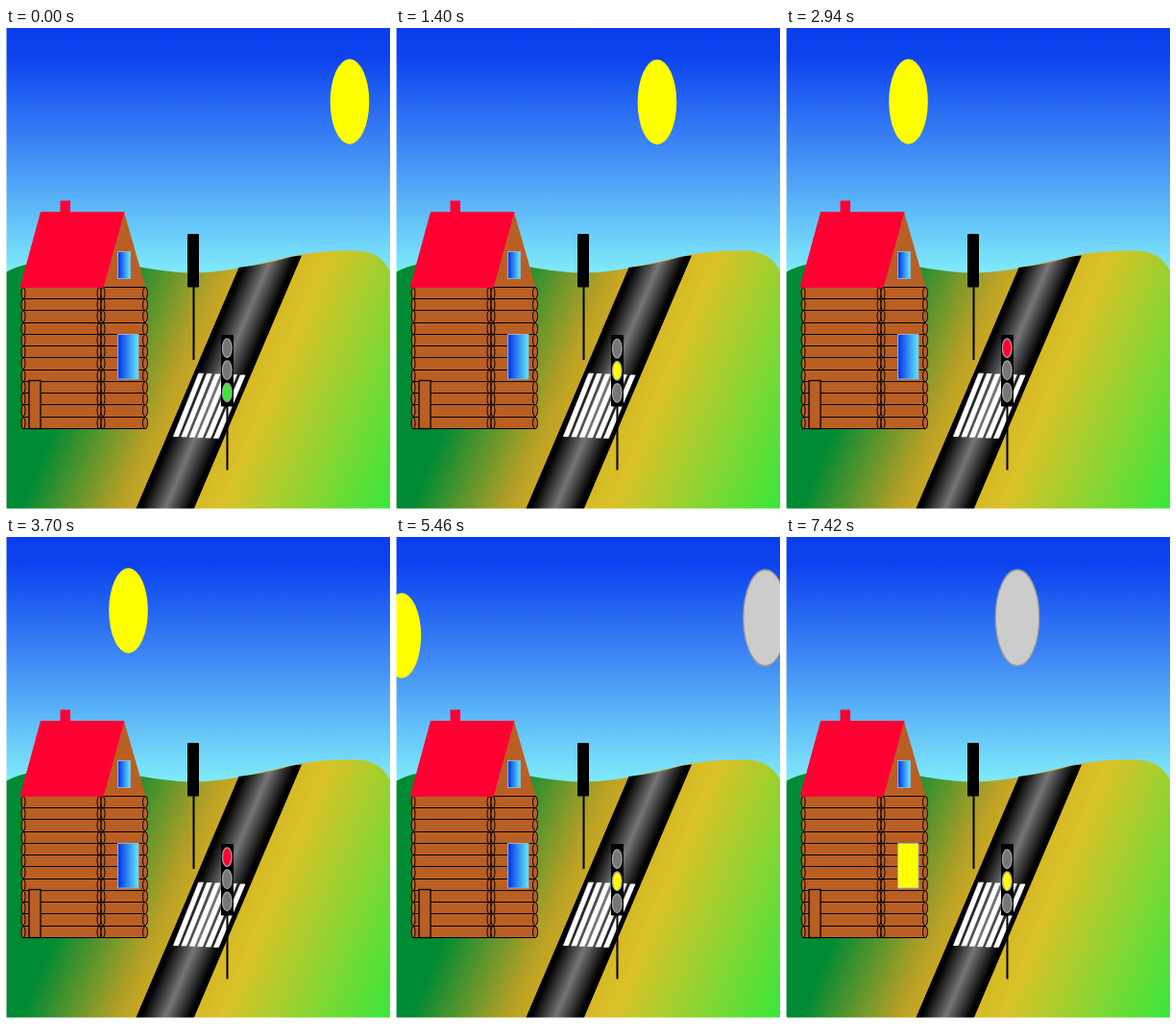
Write an HTML page that moves like this. It is 400 by 500 pixels and loops after 8 s.

```html
<!DOCTYPE html>
<html lang="en">
<head>
<meta charset="utf-8">
<title>Day and night by the crossing</title>
<style>
html, body { margin: 0; width: 100%; height: 100%; overflow: hidden; background: #fff; }
svg { display: block; width: 400px; height: 500px; }
</style>
</head>
<body>
<svg id="stage" viewBox="0 0 400 500">
  <defs>
    <linearGradient id="sky" gradientUnits="userSpaceOnUse" x1="0" y1="0" x2="0" y2="255">
      <stop offset="0" stop-color="#0a3eec"/>
      <stop offset=".11" stop-color="#0c42ee"/>
      <stop offset=".5" stop-color="#3f8af5"/>
      <stop offset="1" stop-color="#80ecfb"/>
    </linearGradient>
    <linearGradient id="grass" gradientUnits="userSpaceOnUse" x1="0" y1="250" x2="426" y2="427.6">
      <stop offset=".24" stop-color="#008a33"/>
      <stop offset=".44" stop-color="#b6a026"/>
      <stop offset=".5" stop-color="#d0aa21"/>
      <stop offset=".66" stop-color="#dac228"/>
      <stop offset="1" stop-color="#3ce63c"/>
    </linearGradient>
    <linearGradient id="asphalt" gradientUnits="userSpaceOnUse" x1="243" y1="249" x2="293.8" y2="270.6">
      <stop offset=".08" stop-color="#000"/>
      <stop offset=".5" stop-color="#757578"/>
      <stop offset=".92" stop-color="#000"/>
    </linearGradient>
    <linearGradient id="glass">
      <stop offset=".1" stop-color="#0c40ee"/>
      <stop offset=".95" stop-color="#5ce2f6"/>
    </linearGradient>
  </defs>

  <rect width="400" height="500" fill="url(#sky)"/>
  <ellipse id="sun" rx="20.3" ry="44.2" fill="#ff0"/>
  <ellipse id="moon" rx="22.8" ry="50" fill="#ccc" stroke="#999" stroke-width="1.3"/>

  <g transform="translate(-.5 -.5)">
    <path fill="url(#grass)" d="M0 254.500Q12 248 24 246C60 240 105 242 140 249C165 253 180 255 198 255
      C230 255 265 245 303 237Q328 232 358 232C382 231 394 239 401 254V501H0Z"/>
    <path fill="url(#asphalt)" d="M243 249.500Q270 246.500 297 238.500Q302 237 308.500 237L196 501H135.500Z"/>
    <g id="crossing" fill="#fff" stroke="#fff" stroke-width=".8" stroke-linejoin="round"></g>

    <rect x="189.500" y="214.500" width="12" height="55.500" rx="1"/>
    <path d="M196 269V345.500M231 393V460" stroke="#000" stroke-width="2"/>
    <rect x="224.500" y="319.500" width="13" height="74.500" rx="1"/>
  </g>
  <g id="lamps" stroke="#a2a2a2" stroke-width="1.300"></g>

  <g fill="#ba5f23">
    <path d="M123 191.500L145.500 269.500H100.500Z"/>
    <rect x="18" y="269.500" width="127" height="147"/>
    <g id="logs" stroke="#000"></g>
    <rect x="24" y="366.500" width="12" height="50" stroke="#000" stroke-width="1.300"/>
  </g>
  <path fill="#ff0033" d="M36 191H56.500V179.500H67V191H123.500L101.500 270H14.500Z"/>
  <g fill="url(#glass)" stroke="#8fb4c8">
    <rect x="116.500" y="232.500" width="13" height="28"/>
    <rect id="window" x="116.500" y="318.500" width="21.500" height="46.500"/>
  </g>

  <!-- soft left and bottom edges -->
  <path fill="#fff" d="M0 0H.5V499.500H400V500H0Z"/>
</svg>
<script>
const LOOP = 8000;
const OFF = '#767676';
const LIT = ['#ff0033', '#ffff00', '#3ce63c'];
const NONE = -1, RED = 0, YELLOW = 1, GREEN = 2;

// Each pose holds until the next one; lampY is the centre of the top lamp.
const poses = [
  { at: 0,    sun: [358, 76.5],   lamp: GREEN,  lampY: 332.7 },
  { at: 1400, sun: [272, 77],     lamp: YELLOW, lampY: 333.2 },
  { at: 2940, sun: [127.5, 76.5], lamp: RED,    lampY: 332.7 },
  { at: 4200, sun: [127.5, 76.5], lamp: GREEN,  lampY: 332.7 },
  { at: 5460, sun: [5.8, 102.5],  moon: [384.6, 84], lamp: YELLOW, lampY: 334.7 },
  { at: 6440, moon: [319.5, 84],  lamp: NONE,   lampY: 334.7 },
  { at: 7420, moon: [241, 84],    lamp: YELLOW, lampY: 334.7, glow: true }
];

const get = id => document.getElementById(id);

function add(parent, tag, attrs) {
  const el = document.createElementNS('http://www.w3.org/2000/svg', tag);
  for (const key in attrs) el.setAttribute(key, attrs[key]);
  return parent.appendChild(el);
}

// Zebra stripes
for (let i = 0; i < 6; i++) {
  const top = 201.2 + i * 8.7, bottom = 175 + i * 8.4, y = 359.7 + i * 0.35;
  add(get('crossing'), 'path', { d: `M${top} ${y}h4.800L${bottom + 5} ${y + 65.3}h-5Z` });
}

// Log walls: two stacks of logs, with thin joints on whole pixel rows
function addLogs(from, to, count) {
  const pitch = (to - from) / count;
  for (let i = 0; i <= count; i++) {
    const y = Math.floor(from + i * pitch) + 0.5;
    add(get('logs'), 'path', { d: `M18 ${y}H145` });
    if (i === count) break;
    for (const [cx, rx] of [[18, 2], [97, 2], [101, 2], [145, 2.5]]) {
      add(get('logs'), 'ellipse', { cx, cy: y + pitch / 2, rx, ry: pitch / 2 });
    }
  }
}
addLogs(269.5, 330.5, 5);
addLogs(330.5, 416.5, 7);

const lamps = LIT.map(() => add(get('lamps'), 'ellipse', { cx: 230.3, rx: 4.8, ry: 9.8 }));

function place(el, pos) {
  el.style.display = pos ? '' : 'none';
  if (!pos) return;
  el.setAttribute('cx', pos[0]);
  el.setAttribute('cy', pos[1]);
}

let shown;
function show(pose) {
  if (pose === shown) return;
  shown = pose;
  place(get('sun'), pose.sun);
  place(get('moon'), pose.moon);
  lamps.forEach((lamp, i) => {
    lamp.setAttribute('cy', pose.lampY + i * 23.1);
    lamp.setAttribute('fill', i === pose.lamp ? LIT[i] : OFF);
  });
  get('window').setAttribute('fill', pose.glow ? '#ff0' : 'url(#glass)');
}

const start = performance.now();
function tick() {
  const t = (performance.now() - start) % LOOP;
  show(poses.filter(p => p.at <= t).pop());
  requestAnimationFrame(tick);
}
tick();
</script>
</body>
</html>
```
